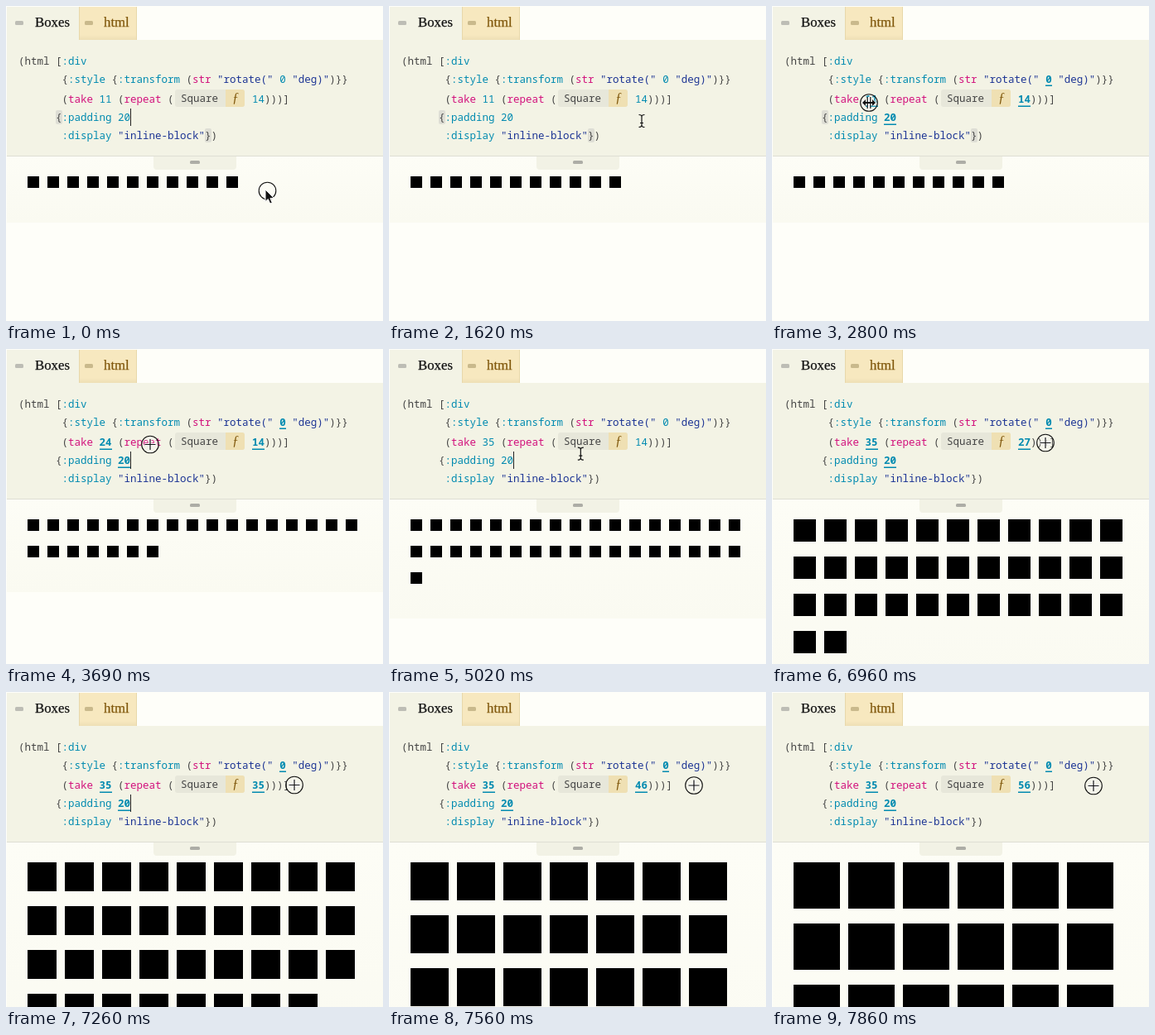
Write an HTML page that moves like this. It is 455x381 px and loops after 8000 ms.

```html
<!DOCTYPE html>
<html lang="en">
<head>
<meta charset="utf-8">
<title>Boxes</title>
<style>
  html, body { margin: 0; width: 100%; height: 100%; overflow: hidden; background: #fefef9; }
  svg { display: block; }
  text { white-space: pre; }
  .code { font: 12.5px "Noto Sans Mono", "DejaVu Sans Mono", monospace; fill: #444; }
  .tab { font: 16.8px "Liberation Serif", "Noto Serif", serif; stroke-width: .25; }
  .key, .num { fill: #008ab0; }
  .str { fill: #1c3494; }
  .fn { fill: #d2107c; }
  .active .num { font-weight: 600; }
  .underline { fill: #008ab0; }
  .brace { fill: #deded5; }
  .halo { fill: none; stroke: #fff; stroke-width: 3; }
  .ink { fill: none; stroke: #111; stroke-width: 1.2; }
</style>
</head>
<body>
<svg width="455" height="381" viewBox="0 0 455 381">
  <defs>
    <linearGradient id="paper" x2="0" y2="1">
      <stop stop-color="#fdfdf6"/><stop offset="1" stop-color="#fafaf1"/>
    </linearGradient>
    <linearGradient id="gold" x2="0" y2="1">
      <stop offset=".85" stop-color="#f7e8bf"/><stop offset="1" stop-color="#eedfb5"/>
    </linearGradient>
  </defs>

  <rect width="455" height="381" fill="#fefef9"/>
  <rect id="output" x="1" y="182" width="454" fill="url(#paper)"/>

  <rect x="1" y="41" width="454" height="140" fill="#f3f3e5"/>
  <rect x="1" y="181" width="454" height="1" fill="#deded4"/>
  <path d="M178 182h100v12q0 4-4 4h-92q-4 0-4-4z" fill="#f2f2e5"/>
  <rect x="222" y="187" width="12" height="4" rx="1.5" fill="#adada6"/>

  <rect x="1" y="1" width="87" height="41" fill="#f3f3e5"/>
  <rect x="88" y="1" width="70" height="40" fill="url(#gold)"/>
  <path d="M88.5 1v40M157.5 1v40" stroke="#e8d8aa"/>
  <rect x="11" y="18" width="10" height="5" rx="1.5" fill="#bdbdb5"/>
  <rect x="95" y="18" width="10" height="5" rx="1.5" fill="#c9b98c"/>
  <text class="tab" x="35" y="25" fill="#111" stroke="#111">Boxes</text>
  <text class="tab" x="118" y="25" fill="#80580c" stroke="#80580c">html</text>

  <g id="braces" class="brace">
    <rect x="60" y="126" width="8" height="17" rx="2"/>
    <rect x="240" y="148" width="8" height="17" rx="2"/>
  </g>

  <g id="code" class="code">
    <text x="15" y="71">(html [<tspan class="key">:div</tspan></text>
    <text x="67.5" y="93">{<tspan class="key">:style</tspan> {<tspan class="key">:transform</tspan> (<tspan class="fn">str</tspan> <tspan class="str">"rotate("</tspan> <tspan class="num">0</tspan> <tspan class="str">"deg)"</tspan>)}}</text>
    <text x="67.5" y="117">(<tspan class="fn">take</tspan> <tspan class="num" id="count">11</tspan> (<tspan class="fn">repeat</tspan> (</text>
    <rect x="204" y="101" width="84" height="21" rx="3" fill="#e7e7da"/>
    <path d="M265 101h20q3 0 3 3v15q0 3-3 3h-20z" fill="#efe0b3"/>
    <text x="211" y="116">Square</text>
    <text x="273" y="116" font-style="italic" fill="#80580c" style="font-family:'Liberation Serif',serif;font-size:16px">ƒ</text>
    <text x="297" y="117"><tspan class="num" id="size">14</tspan>)))]</text>
    <text x="60" y="139">{<tspan class="key">:padding</tspan> <tspan class="num">20</tspan></text>
    <text x="67.5" y="161"><tspan class="key">:display</tspan> <tspan class="str">"inline-block"</tspan>})</text>
  </g>
  <g id="underlines" class="underline">
    <rect x="330" y="95.5" width="8" height="1.5"/>
    <rect x="113" y="120.5" width="15" height="1.5"/>
    <rect x="297" y="120.5" width="15" height="1.5"/>
    <rect x="135" y="142.5" width="15" height="1.5"/>
  </g>
  <rect id="caret" y="124" width="1" height="21" fill="#222"/>
  <path id="squares"/>

  <g id="pointer">
    <circle id="press" r="10.3" fill="#fff" fill-opacity=".15" stroke="#111" stroke-width="1.1"/>
    <g id="arrow">
      <path d="M-2.5-1.5v14.5l3.3-3 2.4 5.6 2.6-1.1-2.4-5.4h4.6z" fill="#111" stroke="#fff" stroke-width="1"/>
    </g>
    <g id="beam">
      <path class="ink" d="M-3.5-7.5q3.5 0 3.5 2.5v10q0 2.5-3.5 2.5M3.5-7.5Q0-7.5 0-5M3.5 7.5Q0 7.5 0 5M-2 2.5h4"/>
    </g>
    <g id="resize">
      <path class="halo" d="M0-7v14M-7 0h14M-4-3l-3 3 3 3M4-3l3 3-3 3"/>
      <path d="M-1.8-7v14M1.8-7v14" stroke="#111" stroke-width="1.2"/>
      <path d="M-8 0l4-4v3h8v-3l4 4-4 4v-3h-8v3z" fill="#111"/>
    </g>
    <g id="cross">
      <path class="halo" d="M0-6.5v13M-6.5 0h13"/>
      <path class="ink" d="M0-6.5v13M-6.5 0h13"/>
    </g>
  </g>
</svg>
<script>
const LOOP = 8000, STEP = 148, LAST_STEP = 53;
const el = id => document.getElementById(id);
const show = (id, on) => { el(id).style.display = on ? "" : "none"; };
const within = (n, ...spans) => spans.some(([from, to]) => n >= from && n <= to);

// Keys are [step, value, ...]; values are linear between them.
const COUNT = [[20, 11], [25, 24], [28, 35]];
const SIZE = [[43, 14], [44, 15], [47, 27], [49, 35], [53, 56]];
const PATH = [
  [2, 315.5, 223.5], [3, 317, 216], [5, 322, 185], [8, 305, 138], [9, 305, 138],
  [10, 305, 139], [11, 305, 139], [13, 250, 152], [15, 165, 140], [17, 117, 117],
  [20, 117, 117], [25, 174, 115.5], [28, 222, 114], [33, 222, 114], [36, 250, 152],
  [38, 285, 140], [40, 303, 115], [42, 303, 115], [43, 304.5, 112.5],
  [44, 306, 112.5], [47, 330, 113.5], [49, 348, 112.5], [53, 388, 113.5]
];

function at(keys, n, i = 1) {
  const next = keys.findIndex(k => k[0] > n);
  if (next === 0) return keys[0][i];
  if (next < 0) return keys[keys.length - 1][i];
  const a = keys[next - 1], b = keys[next];
  return a[i] + (b[i] - a[i]) * (n - a[0]) / (b[0] - a[0]);
}

function pointerKind(n) {
  if (n < 8) return "arrow";
  if (within(n, [8, 16], [33, 40])) return "beam";
  return within(n, [17, 20], [41, 43]) ? "resize" : "cross";
}

function drawSquares(count, size) {
  const left = 26, top = 206, right = 429;
  const columns = Math.floor((right - left + 10) / (size + 10));
  let d = "";
  for (let i = 0; i < count; i++) {
    const x = left + i % columns * (size + 10);
    const y = top + Math.floor(i / columns) * (size + 18);
    d += `M${x} ${y}h${size}v${size}h${-size}z`;
  }
  el("squares").setAttribute("d", d);
  el("output").setAttribute("height", top + Math.ceil(count / columns) * (size + 18) + 24 - 182);
}

function draw(n) {
  const count = Math.round(at(COUNT, n)), size = Math.round(at(SIZE, n));
  el("count").textContent = count;
  el("size").textContent = size;
  drawSquares(count, size);

  const active = within(n, [16, 32], [38, LAST_STEP]);
  el("code").classList.toggle("active", active);
  show("underlines", active);
  show("braces", n < 21);

  show("caret", within(n, [0, 3], [7, 9], [14, 17], [21, 29], [33, 35], [43, 46], [48, 49]));
  el("caret").setAttribute("x", within(n, [43, 46]) ? 135 : 150);

  el("pointer").setAttribute("transform", `translate(${at(PATH, n, 1)} ${at(PATH, n, 2)})`);
  show("press", n === 0 || within(n, [18, 32], [43, LAST_STEP]));
  for (const kind of ["arrow", "beam", "resize", "cross"]) show(kind, kind === pointerKind(n));
}

const start = performance.now();
let shown = -1;
function tick() {
  const t = (performance.now() - start) % LOOP;
  const n = Math.min(LAST_STEP, Math.floor((t + 20) / STEP));
  if (n !== shown) draw(shown = n);
  requestAnimationFrame(tick);
}
tick();
</script>
</body>
</html>
```
